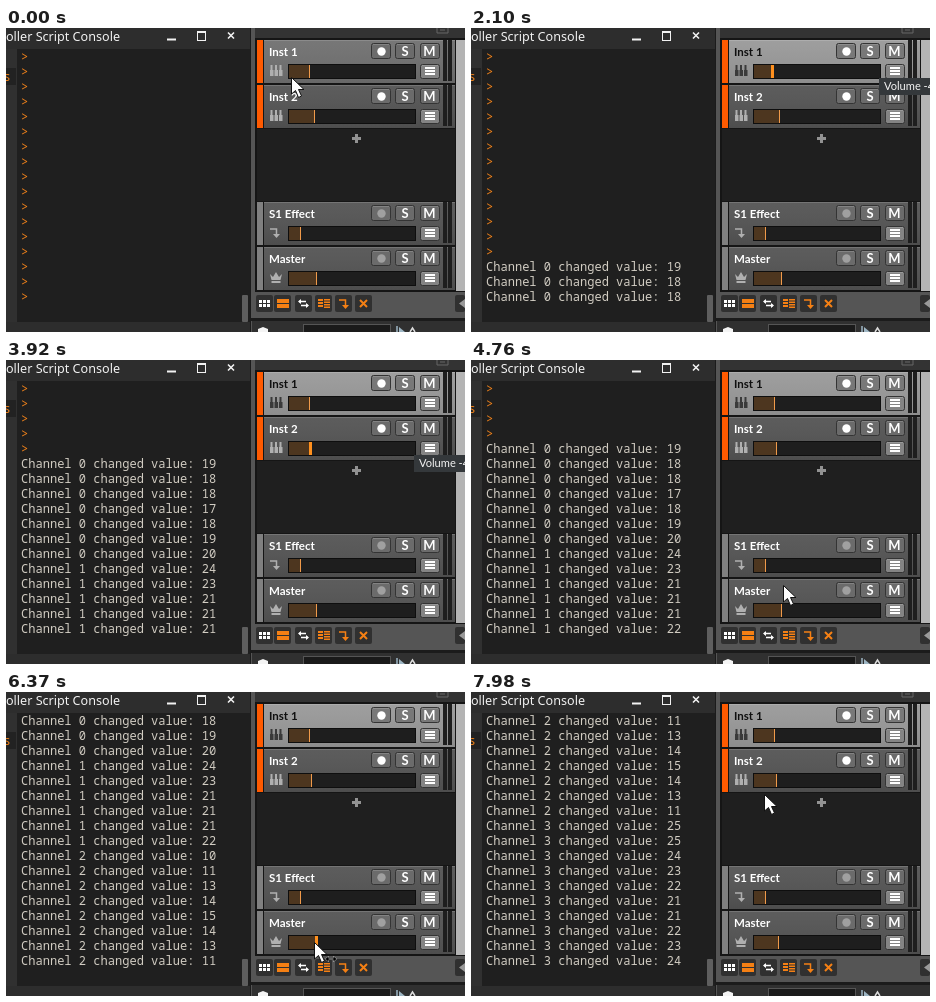
Write an HTML page that moves like this. It is 459 by 304 pixels and loops after 8 s.

```html
<!DOCTYPE html>
<html lang="en">
<head>
<meta charset="utf-8">
<style>
html, body { margin: 0; width: 100%; height: 100%; overflow: hidden; background: #2d2d2d; }
svg { display: block; width: 459px; height: 304px; }
text { white-space: pre; }
.title { font: 500 12.6px "Noto Sans", "Open Sans", sans-serif; fill: #f2f2f2; }
.log { font: 12.05px "Noto Sans Mono", "DejaVu Sans Mono", monospace; fill: #d2cdc3; }
.log.prompt { fill: #f0821a; }
.name { font: bold 11.5px Lato, sans-serif; }
.btn { font: bold 13px Lato, sans-serif; fill: #fff; text-anchor: middle; }
.tip { font: 11.1px Lato, sans-serif; fill: #f4f4f4; }
</style>
</head>
<body>
<svg id="stage" viewBox="0 0 459 304"></svg>
<script>
const LOOP = 8000, STEP = 70, ROWS = 17, ORANGE = '#f58014';
const stage = document.getElementById('stage');

// Each track's slider is dragged once, in order; the log comes in two bursts,
// the second one from `resume`, with `rate` lines per step.
const tracks = [
  { name: 'Inst 1', y: 12, icon: 'keys', value: 20, tip: '-46.2',
    start: 1890, resume: 2380, end: 2940, rate: 1, bursts: ['19 18 18 17', '18 19 20'] },
  { name: 'Inst 2', y: 57, icon: 'keys', value: 25, tip: '-42.8',
    start: 3500, resume: 4130, end: 4480, rate: 1, bursts: ['24 23 21 21 21', '22'] },
  { name: 'S1 Effect', y: 174, icon: 'send', value: 11, tip: '-59.1',
    start: 5250, resume: 5600, end: 5810, rate: 2.5, bursts: ['10 11 13 14 15 14', '13 11'] },
  { name: 'Master', y: 219, icon: 'crown', value: 27, tip: '-39.4',
    start: 6580, resume: 7000, end: 7420, rate: 2.5, bursts: ['25 25 24 23 22 21 21', '22 23 24'] }
];

const events = tracks.flatMap(({ start, resume, rate, bursts }, channel) =>
  bursts.flatMap((burst, b) => burst.split(' ').map((value, i) => ({
    channel, value: +value, time: (b ? resume : start) + STEP * Math.floor((i + 1) / rate)
  }))));

// Pointer moves; it rests in between.
const home = { x: 285, y: 49 };
const moves = [
  { from: 280, to: 560, x: 288, y: 49 },
  { from: 1050, to: 1190, x: 309, y: 45 },
  { from: 1400, to: 1610, x: 305, y: 43 },
  { from: 2940, to: 3360, x: 312, y: 87 },
  { from: 4480, to: 4760, x: 312, y: 225 },
  { from: 4760, to: 5040, x: 295, y: 205 },
  { from: 5810, to: 6160, x: 300, y: 266 },
  { from: 6160, to: 6370, x: 308, y: 250 },
  { from: 7560, to: 7980, x: 293, y: 102 }
];

const ease = k => k * k * (3 - 2 * k);

function pointerAt(t) {
  return moves.reduce((p, m) => {
    const k = ease(Math.min(1, Math.max(0, (t - m.from) / (m.to - m.from))));
    return { x: Math.round(p.x + (m.x - p.x) * k), y: Math.round(p.y + (m.y - p.y) * k) };
  }, home);
}

const rect = (x, y, w, h, fill, extra = '') =>
  `<rect x="${x}" y="${y}" width="${w}" height="${h}" fill="${fill}" ${extra}/>`;
const line = (d, color, width = 1) =>
  `<path d="${d}" fill="none" stroke="${color}" stroke-width="${width}"/>`;
const shape = (d, fill, extra = '') => `<path d="${d}" fill="${fill}" ${extra}/>`;
const text = (cls, x, y, str, extra = '') =>
  `<text class="${cls}" x="${x}" y="${y}" ${extra}>${str}</text>`;
const at = (x, y, body) => `<g transform="translate(${x} ${y})">${body}</g>`;
const bars = (x, y, w, n, gap, h, fill) =>
  Array.from({ length: n }, (_, i) => rect(x, y + i * gap, w, h, fill)).join('');

const icons = {
  keys: c => [0, 4.5, 9].map(x => rect(x, 5, 3.5, 6, c) + rect(x + .5, 0, 2, 5, c)).join(''),
  send: c => line('M0 2H6.5V9', c, 1.5) + shape('M3 7H10L6.5 11Z', c),
  crown: c => shape('M0 2L3 5L6 0L9 5L12 2L10.5 8H1.5ZM1.5 9H10.5V11H1.5Z', c)
};

const button = (x, y, h, fill) =>
  rect(x + .5, y + .5, 19, h, fill, 'rx="2" stroke="#343434"') +
  line(`M${x + 2} ${y + 1.5}H${x + 18}`, 'rgba(255,255,255,.16)');

function trackView({ y, name, icon }, value, fill, lit, thick) {
  const isInst = icon === 'keys', x = 283 + value;
  const key = lit ? '#787878' : '#6b6b6b';
  return rect(251, y, 6, 43, isInst ? '#ff5a00' : '#808080') +
    rect(258, y, 191, 43, fill) + rect(258, y, 191, 43, 'url(#shade)') +
    rect(258, y, 191, 1, 'rgba(255,255,255,.15)') +
    rect(437, y, 4, 41, '#1e1e1e') + rect(442, y, 4, 41, '#1e1e1e') +
    text('name', 263, y + 16, name, `fill="${lit ? '#101010' : '#fff'}"`) +
    at(264, y + 25, icons[icon](lit ? '#3a3a3a' : '#b0b0b0')) +
    [365, 389, 414].map(bx => button(bx, y + 3, 15, key)).join('') +
    `<circle cx="375.5" cy="${y + 11.5}" r="4.2" fill="${isInst ? '#fff' : '#a0a0a0'}"/>` +
    text('btn', 399, y + 16, 'S') + text('btn', 423.5, y + 16, 'M') +
    button(414, y + 24, 14, '#848484') + bars(419, y + 27, 10, 3, 3, 2, '#fff') +
    rect(282.5, y + 24.5, 127, 14, '#1e1e1e', 'stroke="#0e0e0e"') +
    rect(283, y + 25, value, 13, '#4d361f') +
    (thick ? rect(x - 1, y + 25, 3, 13, '#ff901e') : rect(x, y + 25, 1, 13, '#f09a4a'));
}

const tools = [
  [250, [0, 4, 8].map(x => bars(x, 2, 3, 2, 4, 3, '#fff')).join('')],
  [268, bars(0, 1, 12, 2, 5, 4, ORANGE)],
  [289, line('M1 3.5H8M3 7.5H10', '#fff', 1.5) + shape('M3 1V6L0 3.5ZM8 5V10L11 7.5Z', '#fff')],
  [309, bars(0, 1, 5, 3, 3, 2, ORANGE) + bars(6, 1, 6, 4, 2.5, 1.5, ORANGE)],
  [329, at(1, 0, icons.send(ORANGE))],
  [349, line('M2 2L9 9M9 2L2 9', ORANGE, 2)]
];

const defs = '<defs><linearGradient id="shade" x2="0" y2="1">' +
  '<stop stop-color="#fff" stop-opacity=".05"/><stop offset="1" stop-opacity=".08"/>' +
  '</linearGradient></defs>';

const consoleFrame =
  rect(0, 0, 459, 304, '#2d2d2d') + rect(0, 21, 11, 273, '#303030') +
  rect(0, 40, 10, 17, '#222') + text('log prompt', -2.5, 53, 's') +
  rect(11, 21, 233, 273, '#1f1f1f') +
  text('title', 114, 12.6, 'Controller Script Console', 'text-anchor="end"') +
  rect(161, 10.5, 9, 2, '#f2f2f2') +
  rect(191.5, 3.5, 8, 9, 'none', 'stroke="#f2f2f2"') + rect(191, 3, 9, 2, '#f2f2f2') +
  line('M222 4.5L228 10.5M228 4.5L222 10.5', '#f2f2f2', 1.6) +
  rect(236, 267, 6, 27, '#5e5e5e', 'rx="1"');

const mixerFrame =
  rect(244, 0, 215, 304, '#555') + rect(244, 0, 1, 304, '#1b1b1b') +
  rect(249, 0, 210, 10, '#333') + line('M431 0V5H442V0M434 2H439', '#666') +
  rect(249, 10, 210, 254, '#151515') +
  rect(251, 101, 198, 72, '#1f1f1f') +
  rect(346, 109, 9, 3, '#929292') + rect(349, 106, 3, 9, '#929292') +
  rect(450, 12, 9, 251, '#b4b4b4') +
  tools.map(([x, body]) => rect(x, 267, 17, 17, '#303030', 'rx="2"') + at(x + 3, 270, body)).join('') +
  rect(449, 267, 10, 17, '#303030', 'rx="2"') + shape('M459 271V280L453 275.5Z', '#999') +
  rect(244, 290, 215, 3, '#1b1b1b') + rect(246, 293, 213, 11, '#303030') +
  shape('M252 304V301L257 299L262 301V304Z', '#f4f4f4') +
  rect(297.5, 296.5, 87, 10, '#1a1a1a', 'stroke="#555"') +
  line('M391 298V304', '#9eb6c4', 1.5) + shape('M393 304V299L399 304Z', '#9eb6c4') +
  line('M404 304L406.5 300L409 304', '#ddd', 1.5);

const pointerView = (p, resizing) => at(p.x, p.y,
  shape('M.5 .5V17L4.5 13.5L7.5 20.5L10.5 19L7.5 12.5H13Z', '#fff', 'stroke="#111"') +
  (resizing ? shape('M11.5 17L14.5 14.5V16.5H19.5V14.5L22.5 17L19.5 19.5V17.5H14.5V19.5Z',
    '#000', 'stroke="#ddd" stroke-width=".8" paint-order="stroke"') : ''));

const tipView = ({ y, tip }) =>
  rect(408, y + 38, 60, 17, '#34383b') + text('tip', 413, y + 50, `Volume ${tip} dB`);

function draw(t) {
  const p = pointerAt(t);
  const dragged = tracks.find(track => t >= track.start && t < track.end);
  const done = events.filter(e => e.time <= t);

  const rows = [...Array(ROWS).fill(null), ...done].slice(-ROWS).map((e, i) => e
    ? text('log', 15, 33 + i * 15, `Channel ${e.channel} changed value: ${e.value}`)
    : text('log prompt', 15, 33 + i * 15, '&gt;'));

  const onSlider = ({ y }) => p.x > 287 && p.x < 410 && p.y >= y + 23 && p.y <= y + 40;
  const mixer = tracks.map((track, i) => {
    const value = done.filter(e => e.channel === i).pop()?.value ?? track.value;
    const lit = i === 0 && t >= track.start;
    const thick = dragged ? dragged === track : onSlider(track) && Math.abs(p.x - 283 - value) < 9;
    return trackView(track, value, lit ? '#999' : i ? '#545454' : '#707070', lit, thick);
  });

  stage.innerHTML = defs + consoleFrame + rows.join('') + mixerFrame + mixer.join('') +
    (dragged ? tipView(dragged) : pointerView(p, tracks.some(onSlider)));
}

let shown = -1;
function tick() {
  const t = Math.floor(performance.now() % LOOP / STEP) * STEP;
  if (t !== shown) draw(shown = t);
  requestAnimationFrame(tick);
}
tick();
</script>
</body>
</html>
```
